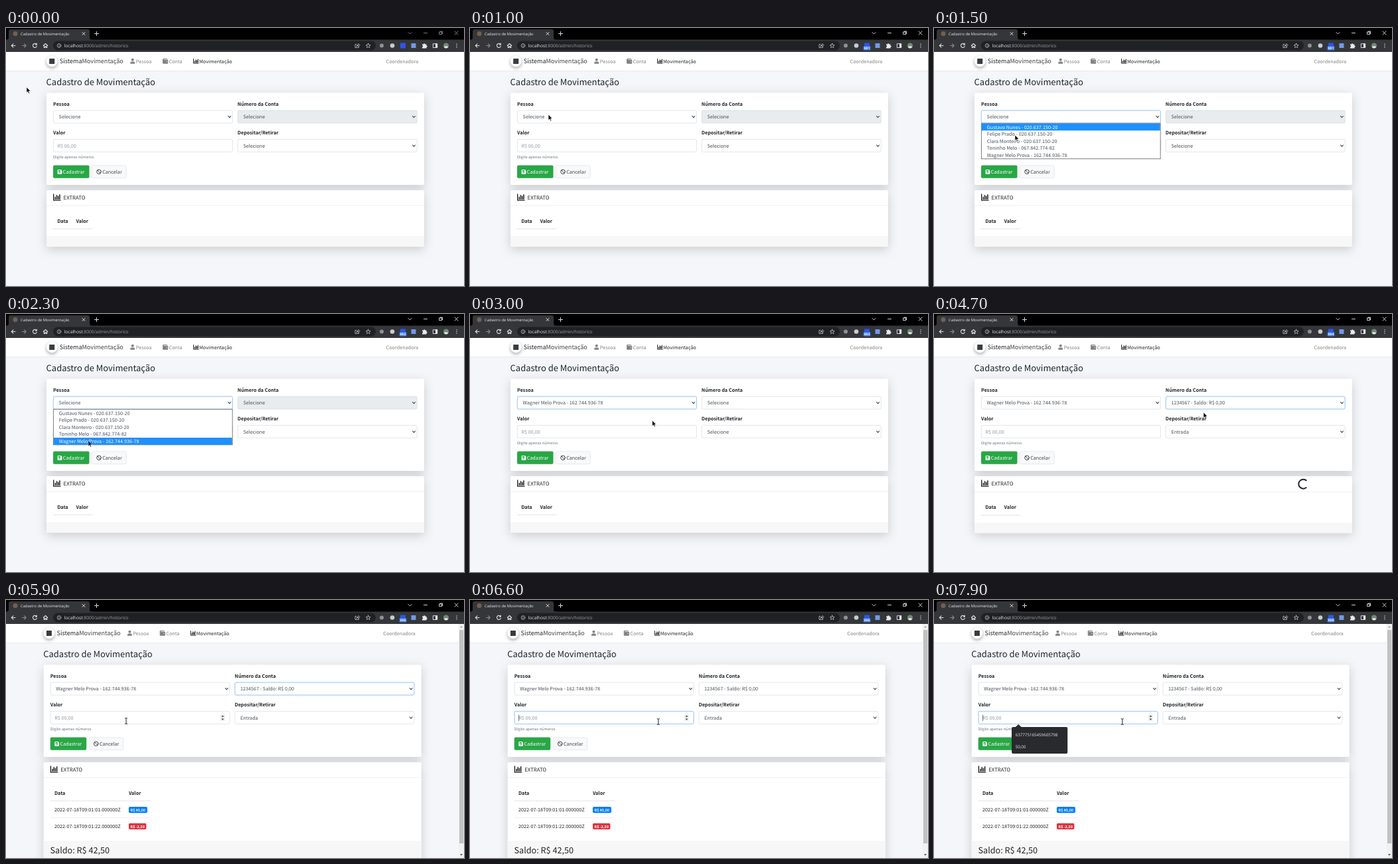
Animation, 690 px wide and 388 px high, one loop 8000 ms. Source, as an HTML page:

```html
<!DOCTYPE html>
<html lang="pt-BR">
<head>
<meta charset="utf-8">
<title>Cadastro de Movimentação</title>
<style>
html, body { margin: 0; width: 100%; height: 100%; overflow: hidden; background: #f4f6f9; }
svg { display: block; width: 100vw; height: 100vh; text-rendering: geometricPrecision; }
text { font: 7.23px "Noto Sans CJK JP", "Noto Sans CJK SC", "Noto Sans CJK", "Noto Sans", sans-serif; fill: #212529; }
.ui text { font: 5.78px "Open Sans", "Noto Sans", sans-serif; fill: #e8eaed; }
.ui .url { font-size: 6.7px; }
text.h1 { font-size: 12.95px; }
text.h3 { font-size: 12.65px; }
text.brand { font-size: 9.05px; }
text.head { font-size: 7.75px; }
text.small { font-size: 5.79px; fill: #6c757d; }
text.tag { font-size: 5.4px; font-weight: 700; fill: #fff; }
text.nav { fill: #828282; }
text.b { font-weight: 700; }
text.val { fill: #495057; }
text.hint { fill: #939ba2; }
.on text, text.w { fill: #fff; }
.line { fill: none; stroke: currentColor; stroke-linecap: round; stroke-linejoin: round; }
.field { fill: #fff; stroke: #ced4da; stroke-width: .6; }
.focus { fill: none; stroke: #80bdff; stroke-width: .7; }
.card { fill: #fff; filter: drop-shadow(0 4px 8px rgba(0,0,0,.17)); }
.rule { fill: none; stroke: #dee2e6; stroke-width: .6; }
.menu { fill: #fff; stroke: #4a4a4a; stroke-width: .7; }
</style>
</head>
<body>
<svg viewBox="0 0 690 388">
<defs>
  <path id="chev" d="M-2-1 0 1.2 2-1" class="line" stroke-width="1.1" color="#343a40"/>
  <g id="chart" class="line" stroke-linecap="butt">
    <path d="M.5 0V6.6H8"/><path d="M2.4 5.3V3.3M4 5.3V1.2M5.6 5.3V2.4M7.2 5.3V.6" stroke-width="1.1"/>
  </g>
</defs>
<rect width="690" height="388" fill="#f4f6f9"/>
<rect y="36" width="690" height="28.3" fill="#fff"/>
<path d="M0 64.5H690" class="rule"/>

<g id="page">
  <!-- navigation -->
  <circle cx="69.2" cy="50" r="8.4" fill="#fff" style="filter:drop-shadow(0 2px 2.5px rgba(0,0,0,.35))"/>
  <rect x="65.2" y="46" width="8" height="8" fill="#3a3d40"/>
  <text x="80.8" y="53.4" class="brand">Sistema<tspan font-weight="300" fill="#444" style="font-weight:300">Movimentação</tspan></text>
  <g fill="#828282">
    <circle cx="190.7" cy="47.8" r="2"/><path d="M187.2 53.8v-1q0-2.3 2.2-2.3h2.6q2.2 0 2.2 2.3v1z"/>
    <path d="M236 47q0-1 1-1h6v1h-5.500v.7h6q.7 0 .7.700v4.700q0 .7-.7.700h-6.500q-1 0-1-1z"/>
    <circle cx="242.300" cy="50.700" r=".6" fill="#fff"/>
  </g>
  <use href="#chart" x="282" y="46.500" color="#222"/>
  <text x="195.800" y="52.800" class="nav">Pessoa</text>
  <text x="245.600" y="52.800" class="nav">Conta</text>
  <text x="291" y="52.800">Movimentação</text>
  <text x="572.600" y="52.800" class="nav">Coordenadora</text>
  <text x="60.600" y="86" class="h1">Cadastro de Movimentação</text>

  <!-- form -->
  <rect x="61" y="97.500" width="569" height="138.500" rx="2" class="card"/>
  <text x="71" y="116.800" class="b">Pessoa</text>
  <text x="348.800" y="116.800" class="b">Número da Conta</text>
  <text x="71" y="160.200" class="b">Valor</text>
  <text x="348.800" y="160.200" class="b">Depositar/Retirar</text>
  <rect x="71.300" y="124" width="270" height="19" rx="2" class="field"/>
  <rect x="349.200" y="124" width="270" height="19" rx="2" class="field" id="account"/>
  <rect x="71.300" y="167.400" width="270" height="19" rx="2" class="field"/>
  <rect x="349.200" y="167.400" width="270" height="19" rx="2" class="field"/>
  <rect x="71.300" y="124" width="270" height="19" rx="2" class="focus" id="focus0"/>
  <rect x="349.200" y="124" width="270" height="19" rx="2" class="focus" id="focus1"/>
  <rect x="71.300" y="167.400" width="270" height="19" rx="2" class="focus" id="focus2"/>
  <use href="#chev" x="336.700" y="133.500"/><use href="#chev" x="614.500" y="133.500"/><use href="#chev" x="614.500" y="177"/>
  <text x="79.600" y="136.300" class="val" id="person"></text>
  <text x="357.400" y="136.300" class="val" id="number"></text>
  <text x="357.400" y="179.800" class="val" id="kind"></text>
  <text x="77.500" y="179.800" class="hint">R$ 00,00</text>
  <path id="caret" d="M77.800 172.500V182" stroke="#222" stroke-width=".6"/>
  <g id="steps">
    <rect x="327.200" y="172" width="7" height="10" fill="#efefef"/>
    <path d="M328.700 175.800l2-2.300 2 2.300zM328.700 178.400l2 2.300 2-2.300z" fill="#444"/>
  </g>
  <text x="71" y="195.700" class="small">Digite apenas números</text>
  <rect x="71" y="206.500" width="54.500" height="19.300" rx="2" fill="#28a745"/>
  <path d="M77.600 213.800q0-.8.800-.8h4.400l1.600 1.600v4.300q0 .8-.8.800h-5.200q-.8 0-.8-.8z" fill="#fff"/>
  <path d="M78.700 214h3.600v1.800h-3.600z" fill="#28a745"/><circle cx="81" cy="217.600" r="1" fill="#28a745"/>
  <text x="85.700" y="219" class="w" style="font-weight:500">Cadastrar</text>
  <rect x="129.500" y="206.800" width="51.800" height="18.700" rx="2" fill="#f8f9fa" stroke="#ddd" stroke-width=".6"/>
  <g class="line" color="#444"><circle cx="140" cy="216.200" r="3.300"/><path d="M137.700 213.900l4.600 4.600"/></g>
  <text x="145.200" y="219" style="fill:#444">Cancelar</text>

  <!-- statement, empty and loaded -->
  <g id="empty">
    <rect x="61" y="244" width="569" height="85" rx="2" class="card"/>
    <g id="body">
      <path d="M61 267H630" class="rule"/>
      <rect x="61" y="313" width="569" height="16" fill="#f7f7f7"/>
      <text x="77.200" y="292.700" class="b">Data</text><text x="105.500" y="292.700" class="b">Valor</text>
      <path d="M71 302H130.500" class="rule" style="stroke-width:1"/>
    </g>
  </g>
  <g id="loaded">
    <rect x="61" y="244" width="569" height="160" rx="2" class="card"/>
    <path d="M61 267H630M71 327.200H222.500" class="rule"/>
    <path d="M71 302H222.500" class="rule" style="stroke-width:1"/>
    <rect x="61" y="362" width="569" height="40" fill="#f7f7f7"/>
    <text x="77.200" y="292.700" class="b">Data</text><text x="189.200" y="292.700" class="b">Valor</text>
    <text x="77.200" y="318">2022-07-18T09:01:01.000000Z</text>
    <text x="77.200" y="342.800">2022-07-18T09:01:22.000000Z</text>
    <rect x="189.200" y="311" width="28" height="9.300" rx="2" fill="#007bff"/>
    <text x="191.800" y="317.800" class="tag">R$ 45,00</text>
    <rect x="189.200" y="335.800" width="26.500" height="9.300" rx="2" fill="#dc3545"/>
    <text x="191.800" y="342.600" class="tag">R$ -2,50</text>
    <text x="70.800" y="381" class="h3">Saldo: R$ 42,50</text>
  </g>
  <use href="#chart" transform="translate(71 250) scale(1.38)" color="#222"/>
  <text x="86.600" y="258.200" class="head">EXTRATO</text>
  <path id="spin" d="M561.300 250.700A7 7 0 1 0 561.300 260.600" fill="none" stroke="#212529" stroke-width="2"/>

  <!-- open lists -->
  <g id="people"><rect x="71.300" y="143.200" width="269.800" height="53.600" class="menu"/></g>
  <g id="accounts">
    <rect x="349.200" y="143.200" width="269.800" height="11.300" class="menu"/>
    <rect x="349.600" y="143.600" width="269" height="10.500" fill="#1e90ff" id="accountBar"/>
    <text x="357.700" y="151.500" class="val">1234567 - Saldo: R$ 0,00</text>
  </g>
  <g id="suggest" class="ui">
    <path d="M127 191l4.500-4 4.500 4H203.500q2 0 2 2V229q0 2-2 2H123.300q-2 0-2-2V193q0-2 2-2z" fill="#292a2d"/>
    <text x="127" y="204.500" style="font-size:6.200px">637775165459605798</text>
    <text x="127" y="222.500" style="font-size:6.200px">50,00</text>
  </g>
</g>

<g id="scroll">
  <rect x="682" y="36" width="8" height="352" fill="#f1f1f1"/>
  <rect x="683" y="45" width="6.200" height="321" fill="#c1c1c1"/>
  <path d="M684 41.500l2-2.500 2 2.500z" fill="#a3a3a3"/><path d="M684 382l2 2.500 2-2.500z" fill="#505050"/>
</g>

<!-- browser -->
<g class="ui" color="#dadce0">
  <rect width="690" height="36" fill="#35363a"/>
  <path d="M0 0H690V17.500H129q-3 0-3-3V5q0-3-3-3H7q-3 0-3 3v9.500q0 3-3 3H0z" fill="#000"/>
  <circle cx="14" cy="8.500" r="3.500" fill="#75604f"/>
  <text x="22" y="10.700">Cadastro de Movimentação</text>
  <path d="M115 6.500l4 4m0-4l-4 4M133.500 8.500h6m-3-3v6" class="line"/>
  <g id="win" class="line" color="#fff" stroke-width=".8">
    <path d="M606 6.500l2.500 2.500 2.500-2.500M629.500 7.500h5M676 5l5 5m0-5l-5 5"/>
    <path d="M653 6h3.600v3.600h-3.600zM654.200 6v-1h3.500v3.500h-1"/>
  </g>
  <rect x="71" y="19.500" width="486" height="14" rx="7" fill="#202124"/>
  <g class="line" stroke-width="1.100">
    <path d="M14 26.500H8.500m2.500-2.700-2.700 2.700 2.700 2.700"/>
    <path d="M24.500 26.500H30m-2.500-2.700 2.700 2.700-2.700 2.700" color="#8a8c90"/>
    <path d="M46 24.800a3 3 0 1 0 .3 2.500M46.300 23v2.200h-2.200"/>
    <path d="M56.300 26.500l3.200-3 3.200 3M57.300 26v3.500h1.500v-2h1.500v2h1.500V26"/>
    <g stroke-width=".7">
      <circle cx="80" cy="26.500" r="2.800"/><path d="M80 26.300v1.600M80 25v.1"/>
      <path d="M528 24.500h-2v5h5.500v-1.500M528 27.500q.5-2.500 3-2.500v-1.500l2 2.200-2 2.200V26.500q-2 0-3 1"/>
      <path d="M545.700 23.200l1 2.200 2.400.2-1.800 1.600.6 2.400-2.200-1.300-2.200 1.300.6-2.400-1.800-1.600 2.400-.2z"/>
    </g>
  </g>
  <text x="87.500" y="28.900" class="url">localhost<tspan fill="#9aa0a6" style="fill:#9aa0a6">:8000/admin/historico</tspan></text>
  <circle cx="566" cy="26.500" r="3" fill="#8d9095"/>
  <circle cx="582" cy="26.500" r="3.300" fill="#c9ccd0"/>
  <rect x="594" y="22.500" width="8" height="8" rx="1" fill="#2d55e8"/>
  <g id="badge"><rect x="592.500" y="27.300" width="11" height="6.200" rx="1" fill="#3b78e7"/>
    <text x="598" y="32.200" text-anchor="middle" id="count" style="font:700 5px Open Sans,sans-serif;fill:#fff"></text></g>
  <rect x="610.500" y="23" width="7" height="7" fill="#6f9be8"/>
  <path d="M627 24.500h2a1.200 1.200 0 0 1 2.400 0h2v2a1.200 1.200 0 0 1 0 2.400v1.600h-6.400v-2a1.200 1.200 0 0 0 0-2.400z" fill="#e8eaed"/>
  <path d="M643.700 23.700h6v5.800h-6z" class="line"/><path d="M647 23.500h3v6h-3z" fill="#e8eaed"/>
  <circle cx="663" cy="26.500" r="4" fill="#6d8a74"/>
  <path d="M659.700 28.700a3.600 2.700 0 0 1 6.600 0 4 4 0 0 1-6.600 0z" fill="#dfe6df"/>
  <path d="M679 24v.1M679 26.500v.1M679 29v.1" class="line" stroke-width="1.400"/>
</g>

<g id="cursor">
  <path id="arrow" d="M0 0V8.200L1.900 6.500 3.200 9.500 4.500 8.900 3.200 6H5.800z" stroke="#fff" stroke-width=".5"/>
  <path id="beam" d="M-2-4.300h1.500l.5.500.5-.5H2M0-4V4M-2 4.300h1.500l.5-.5.5.5H2" fill="none" stroke="#111" stroke-width=".9"/>
</g>
</svg>
<script>
const $ = id => document.getElementById(id);
const LOOP = 8000, ROW = 10.6, TOP = 143.6;
const people = [
  "Gustavo Nunes - 020.637.150-20", "Felipe Prado - 020.637.150-20",
  "Clara Monteiro - 020.637.150-20", "Toninho Melo - 067.842.774-82",
  "Wagner Melo Prova - 162.744.936-78"
];
$("people").innerHTML += people.map((name, i) =>
  `<g><rect x="71.7" y="${TOP + i * ROW}" width="269" height="${ROW}" fill="#1e90ff"/>
   <text x="79.8" y="${151.6 + i * ROW}" class="val">${name}</text></g>`).join("");
const rows = [...$("people").querySelectorAll("g")];

// time, x, y
const path = [
  [0, 31, 89], [150, 31, 89], [950, 118, 130], [1300, 120, 135], [1500, 122, 161],
  [1800, 123, 164], [1950, 123, 164], [2300, 124, 190.5], [2550, 124, 190.5],
  [3400, 400, 135], [3550, 401, 136], [3800, 403, 144], [4250, 406, 148],
  [5050, 406, 148], [5800, 181, 182], [5950, 181, 182], [6400, 283.7, 183]
];
const clamp = v => Math.max(0, Math.min(1, v));

function place(t) {
  const i = path.findIndex(p => p[0] > t);
  if (i < 0) return path[path.length - 1].slice(1);
  const [a, b] = [path[i - 1], path[i]];
  const u = (t - a[0]) / (b[0] - a[0]), k = u * u * (3 - 2 * u);
  return [1, 2].map(j => a[j] + (b[j] - a[j]) * k);
}

const show = (id, on) => { $(id).style.display = on ? "" : "none"; };
const label = (id, s) => { if ($(id).textContent !== s) $(id).textContent = s; };
const light = (row, on) => {
  row.classList.toggle("on", on);
  row.querySelector("rect").style.opacity = +on;
};

function draw(t) {
  const [x, y] = place(t);
  const between = (a, b) => t >= a && t < b;
  const loaded = t >= 5100, loading = between(4700, 5100);
  const hover = t > 2600 && x > 67 && x < 337 && y > 167 && y < 187;

  $("cursor").setAttribute("transform", `translate(${x} ${y})`);
  show("beam", hover);
  show("arrow", !hover);
  show("steps", hover && loaded);

  $("page").setAttribute("transform", `translate(${loaded ? -4.3 : 0} 0)`);
  show("scroll", loaded);
  show("loaded", loaded);
  show("empty", !loaded);
  $("body").setAttribute("transform", `translate(0 ${loading ? .6 : 0})`);
  show("spin", loading);
  $("spin").setAttribute("transform", `rotate(${(t - 4700) * .48} 556.4 255.6)`);

  [[1200, 3500], [3500, 6450], [6450, 9000]].forEach(([a, b], i) => {
    $("focus" + i).style.opacity = clamp((t - a) / 150) - clamp((t - b) / 150);
  });
  label("person", t < 2600 ? "Selecione" : people[4]);
  label("number", t < 4150 ? "Selecione" : "1234567 - Saldo: R$ 0,00");
  label("kind", t < 4200 ? "Selecione" : "Entrada");
  $("account").style.fill = t < 2800 ? "#e9ecef" : "#fff";

  show("people", between(1400, 2600));
  const pick = t < 1600 ? 0 : Math.floor((y - TOP) / ROW);
  rows.forEach((row, i) => light(row, i === pick));
  show("accounts", between(3600, 4150));
  const over = y > 146;
  $("accountBar").style.opacity = +over;
  $("accounts").classList.toggle("on", over);

  show("caret", between(6450, 6900) || t >= 7450);
  show("suggest", t >= 7850);

  const n = Math.floor((t + 30) / 985);
  show("badge", n > 0);
  label("count", String(n).padStart(3, "0"));
  $("win").style.opacity = t < 400 ? .6 : 1;
}

const start = performance.now();
function tick() {
  draw((performance.now() - start) % LOOP);
  requestAnimationFrame(tick);
}
tick();
</script>
</body>
</html>
```
